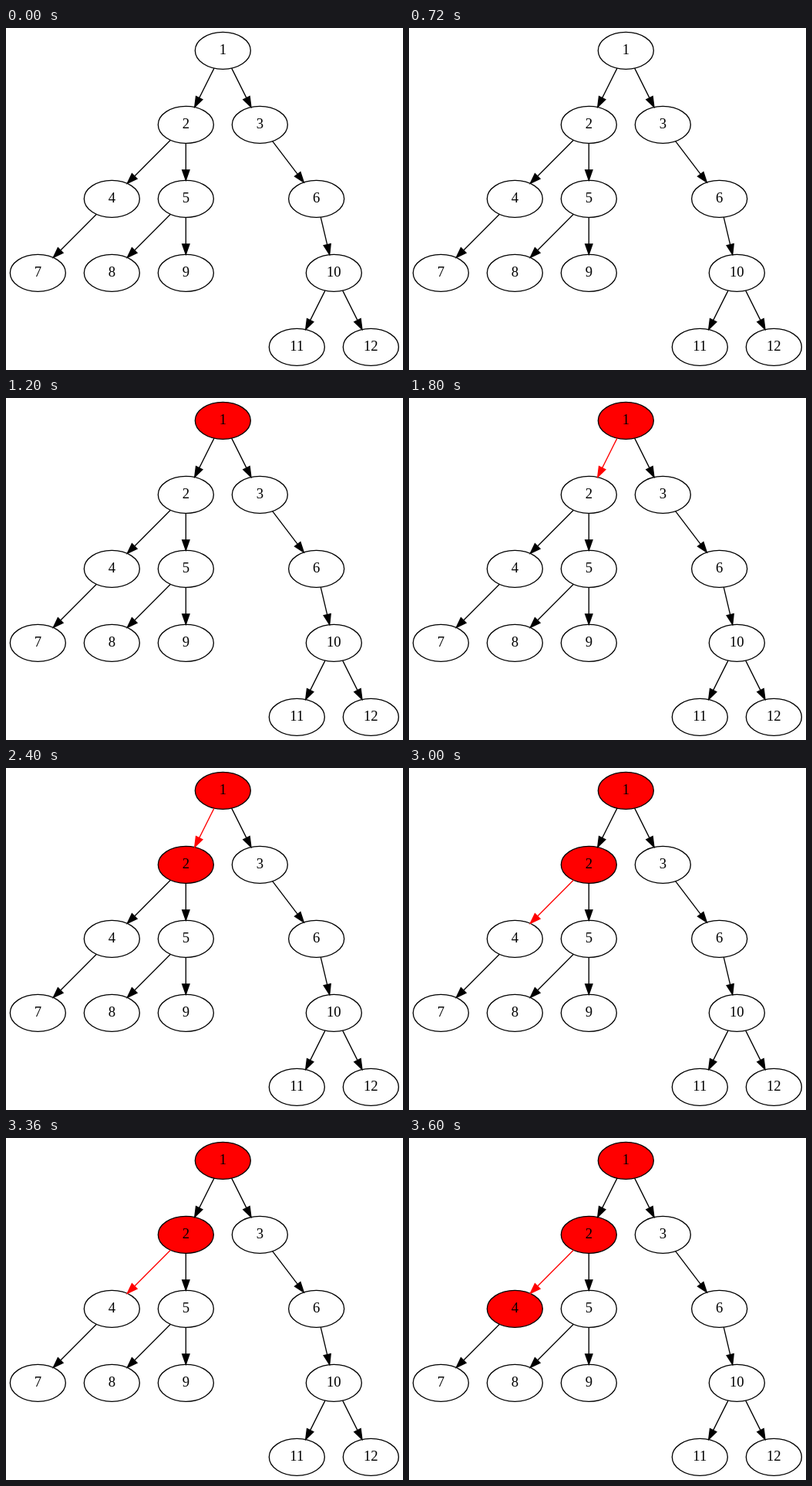
Animation of 515 by 443 pixels, one loop 4200 ms. Source, as an HTML page:

```html
<!DOCTYPE html>
<html lang="en">
<head>
<meta charset="utf-8">
<title>Tree traversal</title>
<style>
  html, body { margin: 0; width: 100%; height: 100%; overflow: hidden; background: #fff; }
  svg { display: block; width: 515px; height: 443px; }
  ellipse { fill: #fff; stroke: #000; }
  .edge { fill: #000; stroke: #000; }
  text { font: 18.667px "Liberation Serif", "Times New Roman", serif; text-anchor: middle; }
</style>
</head>
<body>
<svg id="stage" viewBox="0 0 515 443" stroke-width="1.333"></svg>
<script>
const LOOP = 4200;
const RX = 36, RY = 24;
const HEAD = 13.333, HALF = 4.667;
const RED = '#ff0000';

// label: [x, level]
const nodes = {
  1: [281.33, 0], 2: [233.33, 1], 3: [329.33, 1],
  4: [137.33, 2], 5: [233.33, 2], 6: [402.67, 2],
  7: [41.33, 3], 8: [137.33, 3], 9: [233.33, 3], 10: [425.33, 3],
  11: [377.33, 4], 12: [473.33, 4]
};
const edges = ['1-2', '1-3', '2-4', '2-5', '3-6', '4-7', '5-8', '5-9', '6-10', '10-11', '10-12'];

// part, time it turns red, time it turns back
const steps = [
  ['1', 1200, LOOP],
  ['1-2', 1800, 3000],
  ['2', 2400, LOOP],
  ['2-4', 3000, LOOP],
  ['4', 3600, LOOP]
];

const stage = document.getElementById('stage');
const parts = {};

function add(parent, tag, attrs) {
  const el = document.createElementNS('http://www.w3.org/2000/svg', tag);
  for (const key in attrs) el.setAttribute(key, attrs[key]);
  return parent.appendChild(el);
}

function centre(label) {
  const [x, level] = nodes[label];
  return [x, 29.33 + 96 * level];
}

function drawNode(label) {
  const [cx, cy] = centre(label);
  parts[label] = add(stage, 'ellipse', { cx, cy, rx: RX, ry: RY });
  add(stage, 'text', { x: cx, y: cy + 4.93 }).textContent = label;
}

function drawEdge(name) {
  const [[x1, y1], [x2, y2]] = name.split('-').map(centre);
  const dx = x2 - x1, dy = y2 - y1;
  const len = Math.hypot(dx, dy), ux = dx / len, uy = dy / len;
  const gap = 1 / Math.hypot(dx / RX, dy / RY);   // share of the line inside each ellipse
  const tipX = x2 - dx * gap, tipY = y2 - dy * gap;
  const bx = tipX - ux * HEAD, by = tipY - uy * HEAD;
  const wx = -uy * HALF, wy = ux * HALF;

  const g = parts[name] = add(stage, 'g', { class: 'edge' });
  add(g, 'line', { x1: x1 + dx * gap, y1: y1 + dy * gap, x2: bx, y2: by });
  add(g, 'polygon', { points: [bx + wx, by + wy, tipX, tipY, bx - wx, by - wy].join(' ') });
}

function highlight([name, from, to]) {
  const isEdge = name.includes('-');
  const paint = color => isEdge ? { fill: color, stroke: color } : { fill: color };
  const plain = paint(isEdge ? '#000' : '#fff');
  const key = (look, time) => ({ ...look, offset: time / LOOP, easing: 'step-end' });
  parts[name].animate(
    [key(plain, 0), key(paint(RED), from), key(plain, to), key(plain, LOOP)],
    { duration: LOOP, iterations: Infinity }
  );
}

Object.keys(nodes).forEach(drawNode);
edges.forEach(drawEdge);
steps.forEach(highlight);
</script>
</body>
</html>
```
